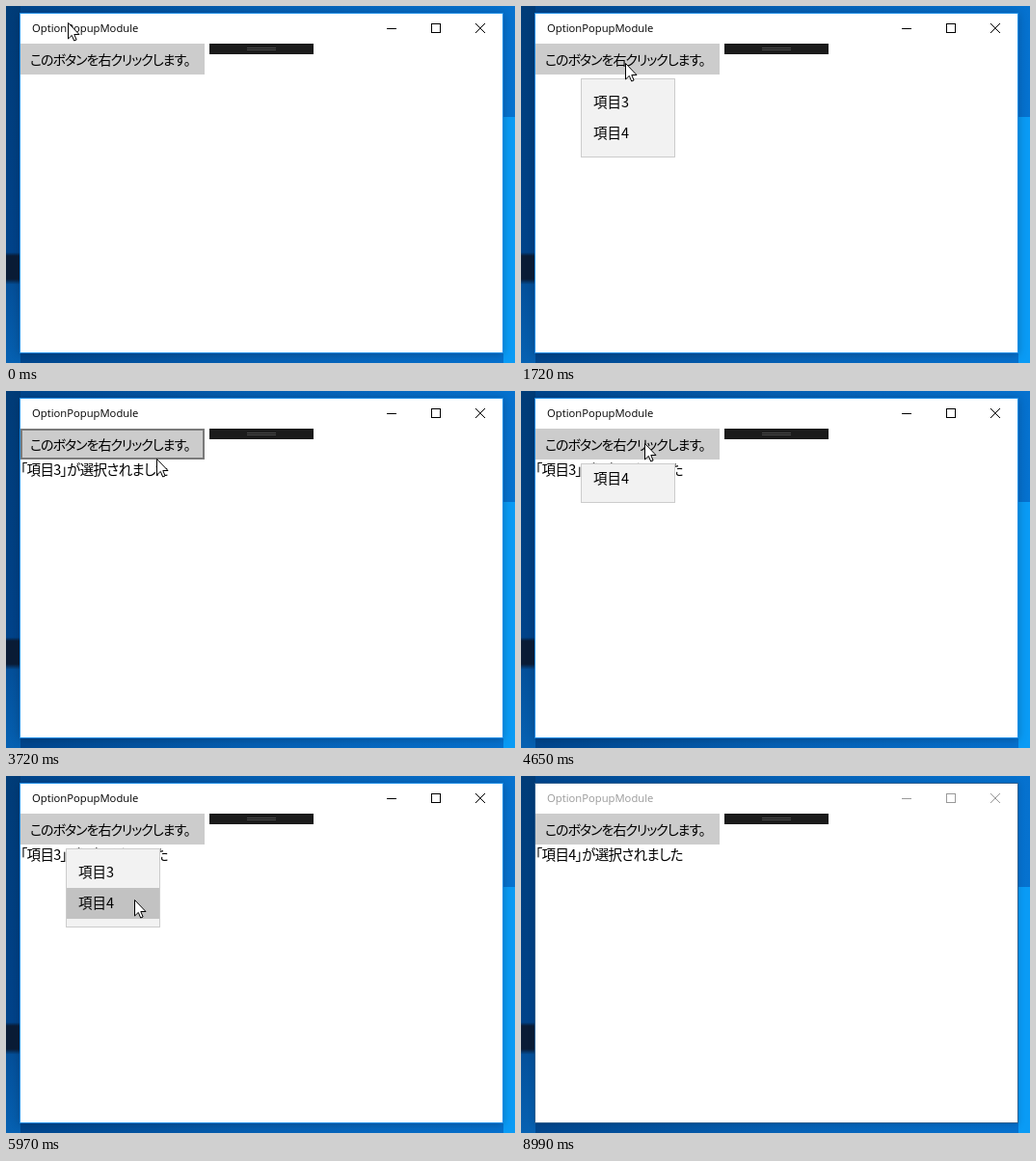
These frames come from a looping animation (528 px wide and 370 px high, 9.15 s). An HTML page:

```html
<!DOCTYPE html>
<html lang="ja">
<head>
<meta charset="utf-8">
<title>Context menu</title>
<style>
  html, body { margin: 0; width: 528px; height: 370px; overflow: hidden; }
  svg { display: block; }
  text {
    font: 14.5px "Noto Sans CJK JP", "Noto Sans CJK", sans-serif;
    font-feature-settings: "palt";
    fill: #000;
  }
  #title { font: 11.25px "Open Sans", "Noto Sans", sans-serif; fill: var(--chrome); }
  #label { font-size: 14px; letter-spacing: -1.05px; }
  #status { letter-spacing: -.68px; }
  #window { --chrome: #000; --edge: #1c8ee6; filter: drop-shadow(0 1px 4px rgba(0, 15, 40, .3)); }
  #window.inactive { --chrome: #999; --edge: #2f6090; filter: drop-shadow(0 1px 3px rgba(0, 15, 40, .2)); }
  #frame { fill: #fff; stroke: var(--edge); }
  #controls { fill: none; stroke: var(--chrome); }
</style>
</head>
<body>
<svg width="528" height="370" viewBox="0 0 528 370">
  <defs>
    <linearGradient id="sky">
      <stop offset="0" stop-color="#00448a"/>
      <stop offset=".5" stop-color="#0560b4"/>
      <stop offset="1" stop-color="#0672cf"/>
    </linearGradient>
    <linearGradient id="side" x2="0" y2="1">
      <stop offset="0" stop-color="#003c78"/>
      <stop offset=".69" stop-color="#00438a"/>
      <stop offset=".7" stop-color="#0a1c36"/>
      <stop offset=".765" stop-color="#0a1c36"/>
      <stop offset=".78" stop-color="#04509a"/>
      <stop offset="1" stop-color="#0661b2"/>
    </linearGradient>
    <clipPath id="menuClip"><rect id="clipBox" x="62" y="75" width="98"/></clipPath>
  </defs>

  <rect width="528" height="370" fill="url(#sky)"/>
  <rect width="15" height="370" fill="url(#side)"/>
  <rect x="516" y="115" width="255" height="255" fill="#0a9bf5"/>

  <g id="window">
    <rect id="frame" x="14.5" y="7.5" width="501" height="352"/>
    <text id="title" x="27" y="27">OptionPopupModule</text>
    <g id="controls">
      <path d="M395 23.5h10M441.5 18.5h9v9h-9z" shape-rendering="crispEdges"/>
      <path d="M487 18l10 10M497 18l-10 10"/>
    </g>
  </g>

  <rect x="211" y="39" width="108" height="11" fill="#1b1b1b"/>
  <path d="M250 43.5h30M250 45.5h30" stroke="#4a4a4a"/>

  <rect x="15" y="39" width="191" height="32" fill="#ccc"/>
  <rect id="hover" x="16" y="40" width="189" height="30" fill="none" stroke="#7a7a7a" stroke-width="2"/>
  <text id="label" x="25" y="61">このボタンを右クリックします。</text>
  <text id="status" x="15" y="86.5"></text>

  <g id="menu">
    <rect id="panel" x="62.5" y="75.5" width="97" fill="#f2f2f2" stroke="#ccc"/>
    <g clip-path="url(#menuClip)">
      <g id="items">
        <rect id="row" x="63" width="96" height="32"/>
        <text x="75" y="104.5">項目3</text>
        <text x="75" y="136.5">項目4</text>
      </g>
    </g>
  </g>

  <path id="cursor" d="M.5 .5V17L4.3 13.4 6.7 19 9.1 18 6.8 12.5H12Z" fill="#fff" stroke="#000"/>
</svg>
<script>
const LOOP = 9150, POINTER_LEAVES = 6730, FOCUS_LOST = 8990;
const OPENING = 300, FADE_DELAY = 80, CLOSING = 330;

const $ = id => document.getElementById(id);
const set = (id, attrs) => {
  for (const name in attrs) $(id).setAttribute(name, attrs[name]);
};
const show = (id, on) => set(id, { visibility: on ? 'visible' : 'hidden' });
const progress = (t, start, end) => Math.min(1, Math.max(0, (t - start) / (end - start)));
const easeOut = p => 1 - (1 - p) ** 3;

// Each glide eases the pointer to a new spot; bend bows its way sideways.
const home = { x: 64, y: 17 };
const glides = [
  { start: 140, end: 320, x: 72, y: 58 },
  { start: 600, end: 920, x: 108, y: 59 },
  { start: 1780, end: 2330, x: 111, y: 98 },
  { start: 3260, end: 3440, x: 150, y: 119 },
  { start: 3440, end: 4190, x: 128, y: 54, bend: 24 },
  { start: 5000, end: 5510, x: 133, y: 128, bend: 8 },
  { start: 6600, end: 6680, x: 132, y: 96 }
];

const sessions = [
  { open: 1460, press: 2720, item: 3 },
  { open: 4650, press: 5970, item: 4 }
];

function pointerAt(t) {
  let { x, y } = home;
  for (const glide of glides) {
    const p = progress(t, glide.start, glide.end);
    x += (glide.x - x) * easeOut(p) + (glide.bend ?? 0) * Math.sin(Math.PI * p);
    y += (glide.y - y) * easeOut(p);
    if (p < 1) break;
  }
  return { x: Math.round(x), y: Math.round(y) };
}

function drawMenu(session, t, y) {
  show('menu', session);
  if (!session) return;
  const { open, press } = session;
  const slide = Math.round(41 * (easeOut(progress(t, open, open + OPENING)) - 1));
  const index = Math.floor((y - 84) / 32);
  const hovered = index === 0 || index === 1;
  set('menu', { opacity: 1 - progress(t, press + FADE_DELAY, press + CLOSING) });
  set('panel', { height: 81 + slide });
  set('clipBox', { height: 82 + slide });
  set('items', { transform: `translate(0 ${slide})` });
  set('row', {
    y: 84 + index * 32,
    fill: !hovered ? 'none' : t >= press ? '#c2c2c2' : '#dadada'
  });
}

function draw(t) {
  const { x, y } = pointerAt(t);
  const session = sessions.find(s => t >= s.open && t < s.press + CLOSING);
  const chosen = sessions.findLast(s => t >= s.press + FADE_DELAY);
  const inButton = x >= 15 && x < 206 && y >= 39 && y < 71;
  const pointing = t < POINTER_LEAVES;

  $('window').classList.toggle('inactive', t >= FOCUS_LOST);
  $('status').textContent = chosen ? `「項目${chosen.item}」が選択されました` : '';
  show('hover', inButton && pointing && !session);
  drawMenu(session, t, y);
  show('cursor', pointing);
  set('cursor', { transform: `translate(${x} ${y})` });
}

const began = performance.now();
function tick() {
  draw((performance.now() - began) % LOOP);
  requestAnimationFrame(tick);
}
tick();
</script>
</body>
</html>
```
